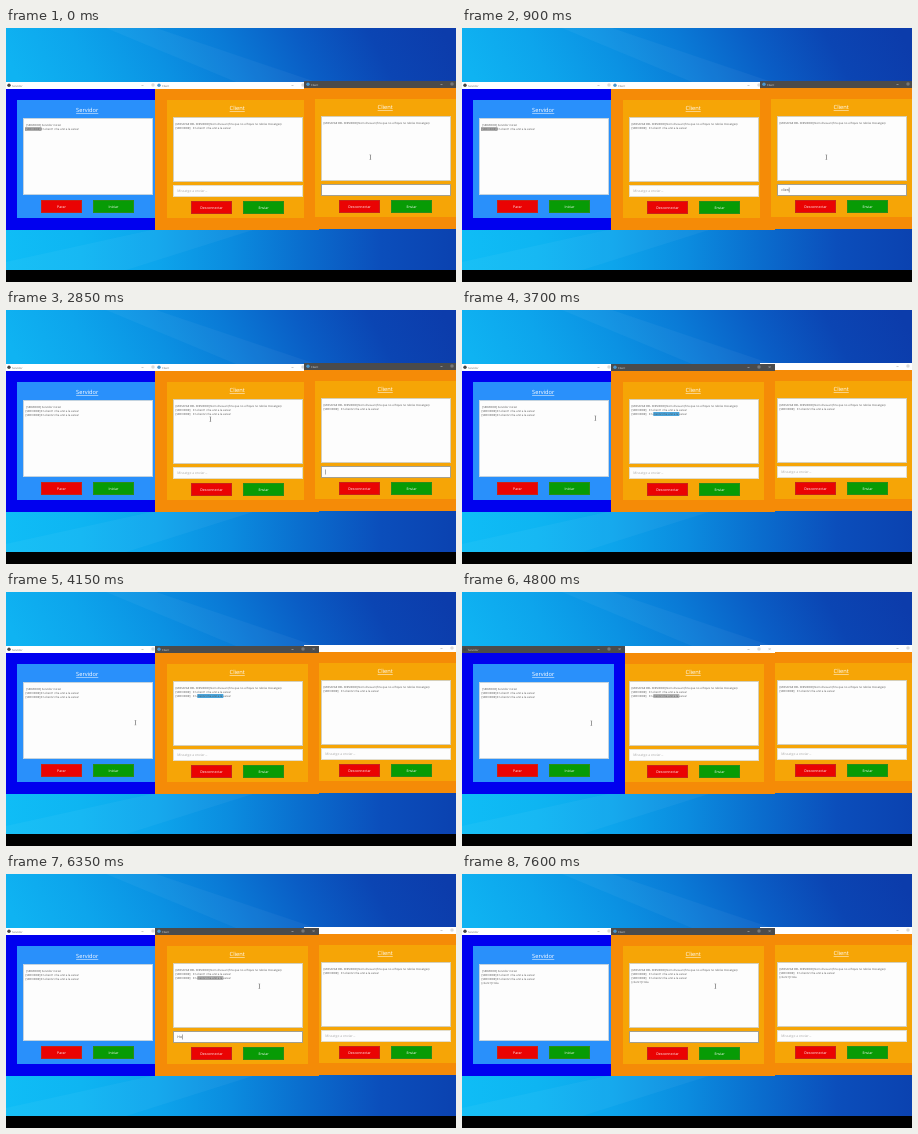
Animation of 450x254 px, one loop 8 s. Source, as an HTML page with a canvas:

```html
<!DOCTYPE html>
<html lang="ca">
<head>
<meta charset="utf-8">
<title>Xat</title>
<style>
  html, body { margin: 0; width: 100%; height: 100%; overflow: hidden; background: #000; }
  canvas { display: block; width: 450px; height: 254px; }
</style>
</head>
<body>
<canvas id="stage"></canvas>
<script>
const LOOP = 8000, W = 450, H = 254;
const JOIN = 1400, CLIENT1_CLICK = 3150, SERVER_CLICK = 4350, INPUT_CLICK = 5100, SEND = 7100;
const canvas = document.getElementById('stage');
const dpr = window.devicePixelRatio || 1;
canvas.width = W * dpr;
canvas.height = H * dpr;
const ctx = canvas.getContext('2d');
ctx.scale(dpr, dpr);
ctx.textRendering = 'geometricPrecision';

const rect = (x, y, w, h, fill) => { ctx.fillStyle = fill; ctx.fillRect(x, y, w, h); };

// One-pixel outline kept inside the given box.
function outline(x, y, w, h, color) {
  ctx.strokeStyle = color;
  ctx.lineWidth = 1;
  ctx.strokeRect(x + 0.5, y + 0.5, w - 1, h - 1);
}

function label(text, x, y, size, color, align = 'left') {
  ctx.font = `${size}px "Open Sans", sans-serif`;
  ctx.textAlign = align;
  ctx.fillStyle = color;
  ctx.fillText(text, x, y);
  return ctx.measureText(text).width;
}

function gradient(x0, y0, x1, y1, colors) {
  const g = ctx.createLinearGradient(x0, y0, x1, y1);
  colors.forEach((c, i) => g.addColorStop(i / (colors.length - 1), c));
  return g;
}

function polygon(points, fill) {
  ctx.beginPath();
  points.forEach(([x, y]) => ctx.lineTo(x, y));
  ctx.fillStyle = fill;
  ctx.fill();
}

function wallpaper() {
  rect(0, 0, W, 120, gradient(0, 27, 360, -153,
    ['#0fb3f2', '#0da5ec', '#0b92e3', '#0a7ad6', '#0a5dc5', '#0b45b3', '#0c3cab']));
  rect(0, 120, W, 122, gradient(0, 0, W, 0,
    ['#0fbdf6', '#0eb5f2', '#0da5ec', '#0b8cdf', '#0a6ccd', '#0b4ebb', '#0b42b0']));
  polygon([[100, 0], [150, 0], [310, 54], [230, 54]], 'rgba(255,255,255,.04)');
  polygon([[0, 242], [0, 234], [150, 201], [250, 201], [120, 242]], 'rgba(255,255,255,.04)');
  rect(0, 242, W, 12, '#000');
}

// Caret is visible for the first half of every second after `start`.
const blink = (t, start) => t >= start && (t - start) % 1000 < 500;

function typing(t, text, keys, sent) {
  if (t >= sent) return { text: '', caret: blink(t, sent) };
  const count = keys.filter(k => t >= k).length;
  return { text: text.slice(0, count), caret: count > 0 && blink(t, keys[count - 1]) };
}

function titleBar({ x, y, name, icon }, active) {
  const ink = active ? '#c4c4c4' : '#999';
  rect(x, y, 164, 7, active ? '#4b4b4b' : '#fff');
  ctx.beginPath();
  ctx.arc(x + 4, y + 3.3, 1.7, 0, 7);
  ctx.fillStyle = icon;
  ctx.fill();
  label(name, x + 7, y + 4.5, 2.7, active ? '#ddd' : '#666');
  rect(x + 136.5, y + 3, 2, 0.5, ink);
  ctx.strokeStyle = ink;
  ctx.lineWidth = 0.4;
  ctx.strokeRect(x + 147, y + 2, 2, 2);
  ctx.beginPath();
  ctx.moveTo(x + 157.5, y + 2); ctx.lineTo(x + 159.7, y + 4.2);
  ctx.moveTo(x + 159.7, y + 2); ctx.lineTo(x + 157.5, y + 4.2);
  ctx.stroke();
}

function button(x, y, text, fill) {
  rect(x, y, 41, 13, fill);
  outline(x, y, 41, 13, 'rgba(120,110,70,.3)');
  label(text, x + 20.5, y + 7.8, 3.5, '#fff', 'center');
}

function logLine({ text, body, selection }, x, y) {
  if (selection) rect(selection.x, y - 3, selection.w, 4, selection.color);
  label(text, x, y, 2.75, '#505050');
  if (body) label(body, x + 17.5, y, 2.75, '#505050');
}

function drawInput(left, top, input, focus) {
  rect(left, top, 130, 12, '#fdfdfd');
  outline(left, top, 130, 12, focus ? '#a3a08f' : '#e3ddca');
  if (!focus) {
    label('Missatge a enviar...', left + 4.3, top + 7.2, 3.4, '#aaa');
    return;
  }
  const width = label(input.text, left + 4.3, top + 7.2, 3.5, '#444');
  if (input.caret) rect(left + 4.3 + width, top + 3.5, 0.5, 5, '#555');
}

function drawWindow(win, active) {
  const { x, y, left, server } = win;
  rect(x, y, 164, 148, win.outer);
  titleBar(win, active);
  rect(left, y + 18, 141, 118, win.inner);

  const headY = y + (server ? 30 : 28);
  const width = label(win.name, left + 70.2, headY, 5.7, '#fff', 'center');
  rect(left + 70.2 - width / 2, headY + 1, width, 0.5, '#fff');

  const boxY = y + (server ? 36 : 35);
  const boxH = server ? 77 : 65;
  rect(left + 6, boxY, 130, boxH, '#fdfdfd');
  outline(left + 6, boxY, 130, boxH, server ? '#c3d3df' : '#d5cfb9');
  win.lines.forEach((line, i) => logLine(line, left + 8.6, boxY + 8 + i * 4));

  if (!server) drawInput(left + 6, y + 103, win.input, active && win.focused);
  const buttonY = y + (server ? 118 : 119);
  button(left + 24, buttonY, server ? 'Parar' : 'Desconnectar', '#ea0303');
  button(left + 76, buttonY, server ? 'Iniciar' : 'Enviar', '#079b05');
}

const ease = p => p * p * (3 - 2 * p);

const pointerPath = [
  [0, 364, 129], [1950, 364, 129], [2700, 204, 109], [2850, 204, 109], [3100, 217, 104],
  [CLIENT1_CLICK, 217, 104], [3450, 191, 104], [3700, 133, 108], [4200, 129, 131],
  [4800, 129, 131], [5100, 212, 168], [5150, 212, 168], [5450, 253, 112], [LOOP, 253, 112]
];

function pointerAt(t) {
  const i = pointerPath.findIndex(p => p[0] > t);
  const [t0, x0, y0] = pointerPath[i - 1], [t1, x1, y1] = pointerPath[i];
  const p = ease((t - t0) / (t1 - t0));
  return [x0 + (x1 - x0) * p, y0 + (y1 - y0) * p];
}

function drawPointer(t) {
  const [x, y] = pointerAt(t);
  rect(x, y - 2, 0.6, 4.5, '#555');
  rect(x - 0.6, y - 2.3, 1.8, 0.4, '#777');
  rect(x - 0.6, y + 2.4, 1.8, 0.4, '#777');
}

const joined = n => `En client${n} s'ha unit a la xarxa!`;
const tag = '[SERVIDOR]';
const welcome = { text: "[MISSATGE DEL SERVIDOR] Nom d'usuari (fins que no el fiquis no rebràs missatges):" };
const greeting = { text: '[client1] Hola' };
const orange = { outer: '#f58b07', inner: '#f6a506', icon: '#4a97cf' };

function dragSelection(t) {
  if (t < CLIENT1_CLICK || t >= SEND) return null;
  const w = 26 * ease(Math.min(1, (t - CLIENT1_CLICK) / 300));
  const active = t < SERVER_CLICK;
  return { x: 217.3 - w, w, color: active ? '#4aa5dc' : '#b5b5b5' };
}

function scene(t) {
  const both = t >= JOIN, sent = t >= SEND ? [greeting] : [];
  const server = {
    name: 'Servidor', server: true, x: -1, y: 54, left: 11,
    outer: '#0000ef', inner: '#2990fb', icon: '#444',
    lines: [
      { text: ' [SERVIDOR] Servidor iniciat' },
      { text: `${tag} ${joined(1)}`, selection: both ? null : { x: 19, w: 16.5, color: '#b0b0b0' } },
      ...(both ? [{ text: `${tag} ${joined(2)}` }] : []),
      ...sent
    ]
  };
  const client1 = {
    name: 'Client', x: 149, y: 54, left: 161, ...orange,
    focused: t >= INPUT_CLICK,
    input: t < 6200 ? { text: '', caret: blink(t, 5250) } : typing(t, 'Hola', [6200, 6350, 6500, 6650], SEND),
    lines: [
      welcome,
      { text: tag, body: joined(1) },
      ...(both ? [{ text: tag, body: joined(2), selection: dragSelection(t) }] : []),
      ...sent
    ]
  };
  const client2 = {
    name: 'Client', x: 298, y: 53, left: 309, ...orange, focused: true,
    input: typing(t, 'client2', [150, 400, 550, 700, 850, 1000, 1200], JOIN),
    lines: [welcome, ...(both ? [{ text: tag, body: joined(2) }] : []), ...sent]
  };
  if (t < CLIENT1_CLICK) return [server, client1, client2];
  if (t >= SERVER_CLICK && t < INPUT_CLICK) return [client2, client1, server];
  return [server, client2, client1];
}

function draw(now) {
  const t = now % LOOP;
  wallpaper();
  scene(t).forEach((win, i) => drawWindow(win, i === 2));
  drawPointer(t);
  requestAnimationFrame(() => draw(performance.now() - start));
}

const start = performance.now();
draw(0);
</script>
</body>
</html>
```
